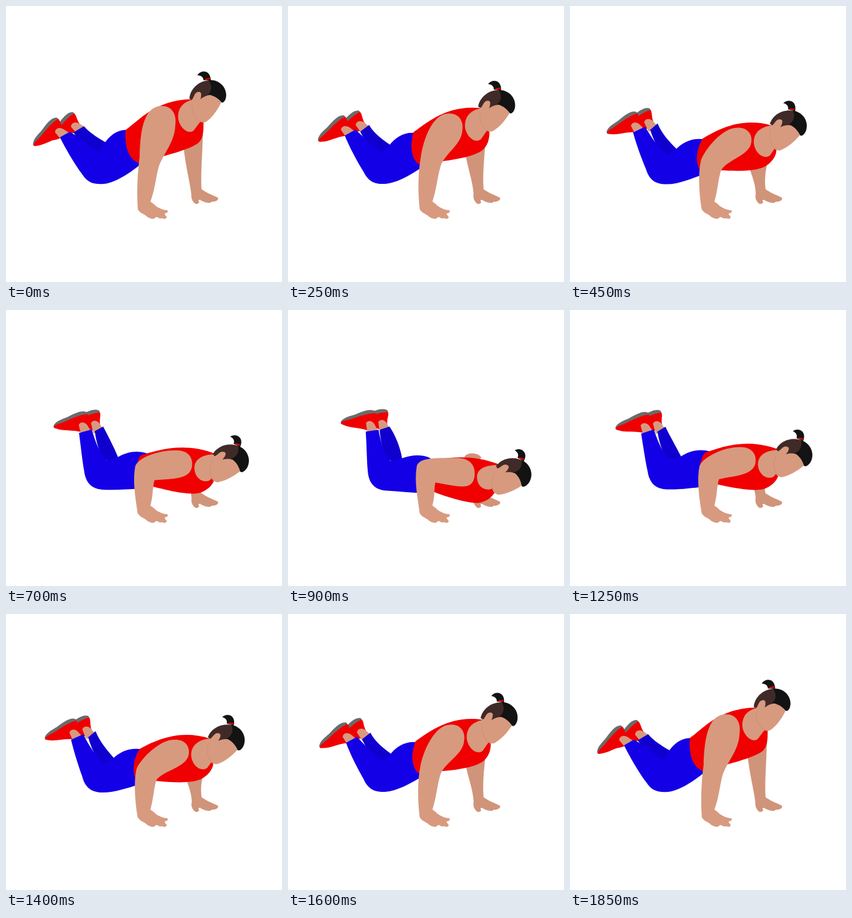
These frames come from a looping animation (450 by 450 pixels, 1.9 s). An HTML page:

```html
<!DOCTYPE html>
<html lang="en">
<head>
<meta charset="utf-8">
<title>Knee push-up</title>
<style>
  html, body { margin: 0; width: 100%; height: 100%; overflow: hidden; background: #fff; }
  svg { display: block; width: 100%; height: 100%; }
  .skin { fill: #d79a7f; }
  .shade { fill: #d0947a; }
  .red { fill: #f00000; }
  .blue { fill: #1400e6; }
  .navy { fill: #1000cf; }
  .sole { fill: #6b6b6b; }
  .brown { fill: #402a27; }
  .black { fill: #131313; }
  .jaw { fill: none; stroke: #cb9077; stroke-width: 1; }
</style>
</head>
<body>
<svg viewBox="0 0 450 450">
  <defs>
    <g id="foot">
      <path class="sole" d="M44 226C44 217 52 210 58 203C66 192 74 181 83 182L86 185L60 212L46 228Z"/>
      <path class="red" d="M45 227C46 222 51 219 57 212C66 201 76 189 85 184C89 187 89 194 94 201L88 215C76 217 62 227 50 228C46 229 45 228 45 227Z"/>
      <path class="skin" d="M80 206C80 199 88 197 94 201L105 208L91 219Z"/>
    </g>
  </defs>

  <path id="farShoulder" class="shade"/>
  <path id="farArm" class="shade"/>
  <path class="shade" d="M303 306C301 314 304 318 308 322C311 324 314 322 315 320C314 318 313 316 316 316C320 318 325 321 331 321C335 321 334 319 337 319C341 319 346 317 346 314C346 312 342 311 338 309C331 306 325 303 319 299Z"/>

  <use id="farFoot" href="#foot"/>
  <path id="farLeg" class="navy"/>
  <use id="nearFoot" href="#foot"/>
  <path id="nearLeg" class="blue"/>

  <path id="torso" class="red"/>
  <path id="chest" class="skin"/>

  <g id="head">
    <path class="black" d="M322 121C322 117 319 113 312 113C317 104 333 103 334 121Z"/>
    <path class="brown" d="M299 151C300 135 315 121 333 121L340 148L318 153L308 155Z"/>
    <path class="black" d="M330 121C346 119 359 131 359 145C359 153 355 159 351 157C346 150 338 148 328 146C337 138 336 128 330 121Z"/>
    <path class="red" d="M324 119L332 117L333 119L325 121Z"/>
    <path class="skin" d="M303 153C307 149 307 140 314 140C319 139 319 146 317 152C322 148 326 146 332 145C341 147 346 151 351 157C345 170 336 182 326 189C316 193 306 180 304 166Z"/>
    <path class="jaw" d="M303 160C303 175 310 186 320 190"/>
  </g>

  <path id="nearArm" class="skin"/>
  <path class="skin" d="M215 330C216 336 222 338 227 341C231 345 236 347 240 347C243 347 243 344 246 344C249 346 252 347 255 346C258 348 262 347 262 344C261 342 258 340 259 338C263 338 265 335 263 333C256 333 248 329 243 325C240 321 237 321 235 318Z"/>
</svg>
<script>
  const LOOP = 1900, STEP = 50;
  const MID = 0.541, LOW = 0.94; // depth of the second and third pose

  // Each outline in three poses: raised, halfway, lowered.
  const outlines = {
    farShoulder: [
      'M271 180C275 172 295 172 299 180L285 190Z',
      'M292 215C296 207 316 207 320 215L306 225Z',
      'M289 237C293 229 312 229 317 238L303 248Z'
    ],
    farArm: [
      'M303 314C301 290 293 265 289 225L321 195C321 240 317 270 319 300Z',
      'M303 314C304 290 296 280 292 262L322 262C318 275 317 285 319 300Z',
      'M303 314C302 308 302 300 302 285L318 285C318 290 317 296 319 300Z'
    ],
    farLeg: [
      'M110 206C116 216 126 228 140 238L165 245L162 222C148 214 136 206 127 196Z',
      'M134 201C138 215 143 228 152 240L172 250L176 235C163 220 153 208 146 191Z',
      'M148 196C149 210 152 225 160 243L178 250L185 242C180 222 172 205 163 190Z'
    ],
    nearLeg: [
      'M88 214C95 229 112 258 124 274C134 290 146 291 160 290C180 288 205 270 222 256C214 250 208 225 202 203C186 199 170 209 160 225L151 238C138 230 120 214 104 205Z',
      'M106 205C111 225 118 248 124 264C129 284 140 291 158 291C178 291 200 283 217 278C216 262 220 240 224 221C206 217 188 222 174 236L160 243C148 235 136 216 126 196Z',
      'M124 199C126 220 127 245 129 262C131 284 142 293 160 294C180 295 200 296 218 296C220 275 222 255 232 239C216 232 199 235 185 241L166 246C156 235 149 216 145 195Z'
    ],
    torso: [
      'M195 202C216 188 242 153 303 152L322 187C322 205 322 215 314 223C298 235 262 243 217 256C200 250 193 230 195 202Z',
      'M218 220C242 207 282 187 332 203L338 243C338 253 328 265 316 270C298 277 262 275 211 268C206 256 207 236 218 220Z',
      'M218 244C243 240 288 224 344 246L340 286C336 298 326 306 312 309C292 311 250 298 222 288C213 280 212 255 218 244Z'
    ],
    chest: [
      'M308 152C284 156 279 172 281 185C284 200 298 210 306 203L318 187Z',
      'M334 203C308 205 301 219 302 232C304 248 318 258 328 251L336 240Z',
      'M344 247C318 246 307 256 308 269C309 284 322 291 332 287L341 280Z'
    ],
    nearArm: [
      'M215 333C213 305 214 275 218 245C219 205 224 163 254 163C270 163 279 176 276 195C275 222 257 240 249 262C244 280 243 300 235 320Z',
      'M215 333C210 305 208 272 213 252C220 236 250 205 274 205C291 204 300 215 298 228C296 250 256 255 245 271C241 284 240 305 235 320Z',
      'M215 333C211 305 206 280 210 256C213 240 245 237 276 237C297 237 306 249 304 265C301 288 278 284 241 280C238 290 240 305 235 320Z'
    ]
  };

  // Rigid parts: pivot in the drawing, its place in the three poses, full turn in degrees.
  const rigid = {
    farFoot: { pivot: [96, 208], x: [122, 139, 157], y: [199, 195, 193], turn: 32 },
    nearFoot: { pivot: [96, 208], x: [96, 118, 137], y: [208, 200, 195], turn: 32 },
    head: { pivot: [320, 190], x: [320, 338, 338], y: [190, 244, 292], turn: 31 }
  };

  const el = id => document.getElementById(id);
  const numbers = d => d.match(/-?[\d.]+/g).map(Number);

  const shapes = Object.entries(outlines).map(([id, poses]) => ({
    node: el(id), template: poses[0], poses: poses.map(numbers)
  }));

  // Parabola through the three poses
  function blender(p) {
    const a = (p - MID) * (p - LOW) / (MID * LOW);
    const b = p * (p - LOW) / (MID * (MID - LOW));
    const c = p * (p - MID) / (LOW * (LOW - MID));
    return (u, v, w) => a * u + b * v + c * w;
  }

  function draw(ms) {
    const depth = (1 - Math.cos(2 * Math.PI * ms / LOOP)) / 2;
    const mix = blender(depth);

    for (const { node, template, poses: [u, v, w] } of shapes) {
      let i = 0;
      node.setAttribute('d', template.replace(/-?[\d.]+/g, () => {
        const n = mix(u[i], v[i], w[i]);
        i++;
        return n.toFixed(2);
      }));
    }
    for (const [id, { pivot: [px, py], x, y, turn }] of Object.entries(rigid)) {
      el(id).setAttribute('transform',
        `translate(${mix(...x)} ${mix(...y)}) rotate(${turn * depth}) translate(${-px} ${-py})`);
    }
  }

  const start = performance.now();
  function tick() {
    // The motion is stepped; the small lead absorbs timer jitter.
    const t = performance.now() - start + 8;
    draw(Math.floor(t / STEP) * STEP % LOOP);
    requestAnimationFrame(tick);
  }
  tick();
</script>
</body>
</html>
```
